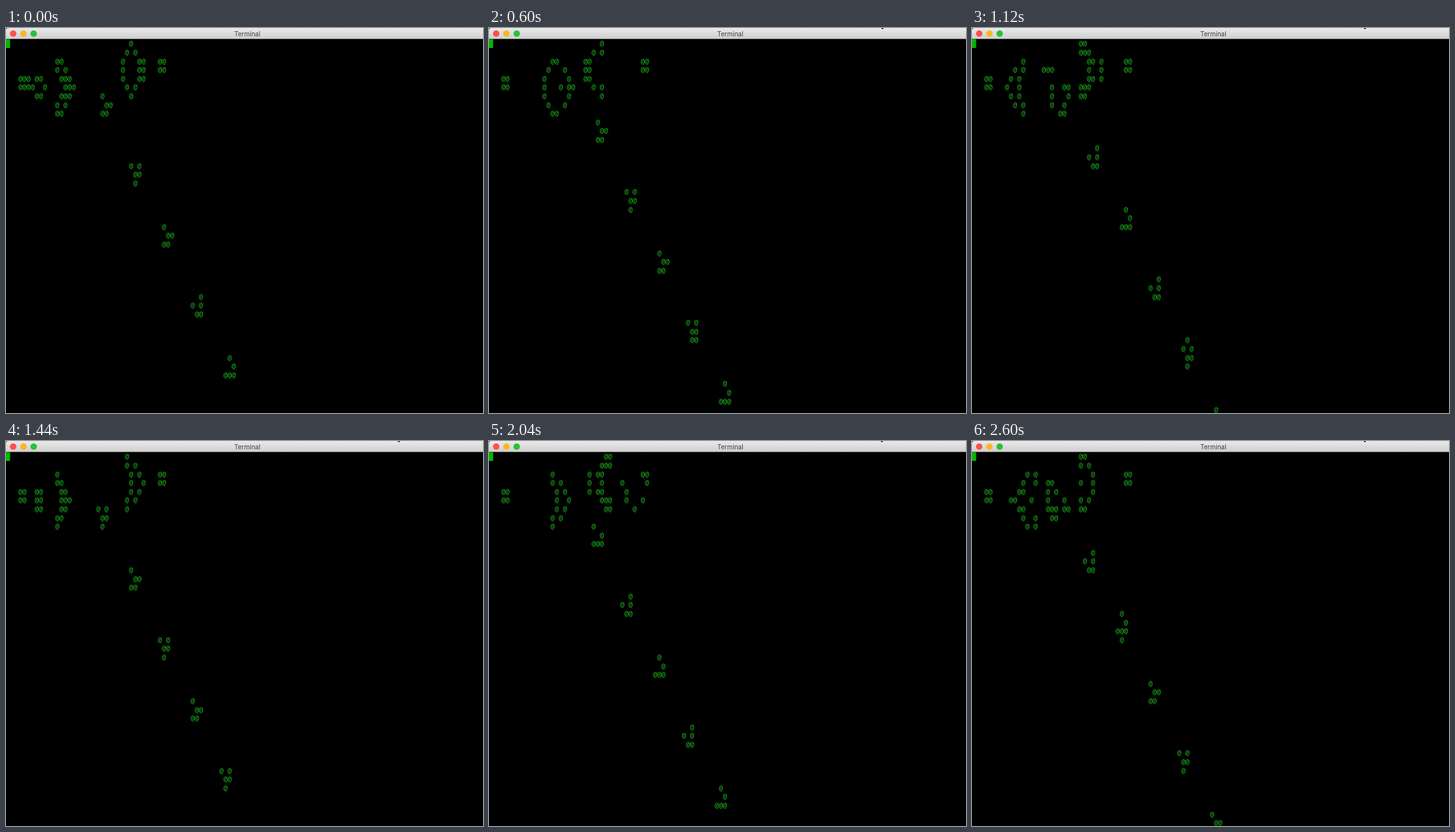
An HTML page with a canvas for the animation above (2640 ms loop, 744 by 600 pixels).

```html
<!DOCTYPE html>
<html lang="en">
<head>
<meta charset="utf-8">
<title>Terminal</title>
<style>
  html, body { margin: 0; width: 100%; height: 100%; overflow: hidden; background: #000; }
  canvas { display: block; }
</style>
</head>
<body>
<canvas id="stage" width="744" height="600"></canvas>
<script>
const ctx = document.getElementById('stage').getContext('2d');
const LOOP = 2640, TICK = 40;
const COLS = 116, WORLD_ROWS = 64, ROWS = 43;
const CELL_W = 6.4, CELL_H = 13.59, TOP = 17.5;
const FIRST = 121, LAST = 173, SEED_GEN = -17;

// Gosper glider gun
const GUN = [
  '........................O',
  '......................O.O',
  '............OO......OO............OO',
  '...........O...O....OO............OO',
  'OO........O.....O...OO',
  'OO........O...O.OO....O.O',
  '..........O.....O.......O',
  '...........O...O',
  '............OO'
];

// Ticks on which the screen does not refresh
const HELD = [3, 9, 19, 29, 32, 35, 40, 44, 51, 58, 63];

// [refresh, generation]; the fraction is the share of rows, from the bottom, already redrawn
const PACE = [[0, 121.4], [7, 128], [19, 138.4], [30, 149], [37, 155.44], [48, 165.03], [54, 170.51]];

function seed() {
  const world = new Uint8Array(COLS * WORLD_ROWS);
  GUN.forEach((line, y) => [...line].forEach((c, x) => {
    if (c === 'O') world[y * COLS + x + 3] = 1;
  }));
  return world;
}

function evolve(world) {
  const next = new Uint8Array(world.length);
  const at = (x, y) => x < 0 || y < 0 || x >= COLS || y >= WORLD_ROWS ? 0 : world[y * COLS + x];
  for (let y = 0; y < WORLD_ROWS; y++) {
    for (let x = 0; x < COLS; x++) {
      let n = -at(x, y);
      for (let dy = -1; dy < 2; dy++)
        for (let dx = -1; dx < 2; dx++) n += at(x + dx, y + dy);
      next[y * COLS + x] = n === 3 || (n === 2 && at(x, y)) ? 1 : 0;
    }
  }
  return next;
}

const worlds = [];
for (let g = SEED_GEN, w = seed(); g <= LAST; g++, w = evolve(w)) {
  if (g >= FIRST) worlds[g] = w;
}

function paceAt(step) {
  let i = 0;
  while (i < PACE.length - 2 && step >= PACE[i + 1][0]) i++;
  const [s0, g0] = PACE[i], [s1, g1] = PACE[i + 1];
  return step === s1 ? g1 : g0 + (g1 - g0) * (step - s0) / (s1 - s0);
}

function drawTitleBar(tick) {
  const shade = ctx.createLinearGradient(0, 0, 0, 17);
  shade.addColorStop(0, '#e9e9e9');
  shade.addColorStop(1, '#cfcfcf');
  ctx.fillStyle = shade;
  ctx.beginPath();
  ctx.moveTo(0, 17);
  ctx.lineTo(0, 3);
  ctx.quadraticCurveTo(0, 0, 3, 0);
  ctx.lineTo(744, 0);
  ctx.lineTo(744, 17);
  ctx.fill();
  ctx.fillStyle = '#a9a9a9';
  ctx.fillRect(0, 16.5, 744, 0.7);

  ['#fc504d', '#fdb424', '#27c138'].forEach((color, i) => {
    ctx.fillStyle = color;
    ctx.beginPath();
    ctx.arc(11.2 + 16 * i, 8.8, 5, 0, 7);
    ctx.fill();
  });

  ctx.fillStyle = '#404040';
  ctx.font = '10px Inter, Roboto, sans-serif';
  ctx.textAlign = 'center';
  ctx.fillText('Terminal', 376.3, 12.7);

  // Tip of the mouse pointer
  if (tick >= 4) {
    const x = tick < 16 ? 613.5 : 612.5;
    ctx.fillStyle = '#222';
    ctx.fillRect(x - 1.5, 0, 3, 1);
    ctx.fillRect(x, 1, 1.5, 1);
  }
}

function draw(tick) {
  const step = tick - HELD.filter(h => h <= tick).length;
  const pace = paceAt(step), gen = Math.floor(pace);
  const tear = Math.round(ROWS * (1 - (pace - gen)));

  ctx.fillStyle = '#000';
  ctx.fillRect(0, 0, 744, 600);
  drawTitleBar(tick);

  ctx.fillStyle = '#00b900';
  ctx.fillRect(0, TOP, CELL_W, CELL_H);

  ctx.fillStyle = '#1ec81e';
  ctx.font = '10.63px "DejaVu Sans Mono", monospace';
  ctx.textAlign = 'left';
  for (let y = 0; y < ROWS; y++) {
    const world = worlds[y < tear ? gen : gen + 1];
    for (let x = 0; x < COLS; x++) {
      if (world[y * COLS + x]) ctx.fillText('@', x * CELL_W, TOP + 9.9 + y * CELL_H);
    }
  }
}

const start = performance.now();
let shown = -1;
function frame() {
  const tick = Math.floor((performance.now() - start) % LOOP / TICK);
  if (tick !== shown) draw(shown = tick);
  requestAnimationFrame(frame);
}
frame();
</script>
</body>
</html>
```
